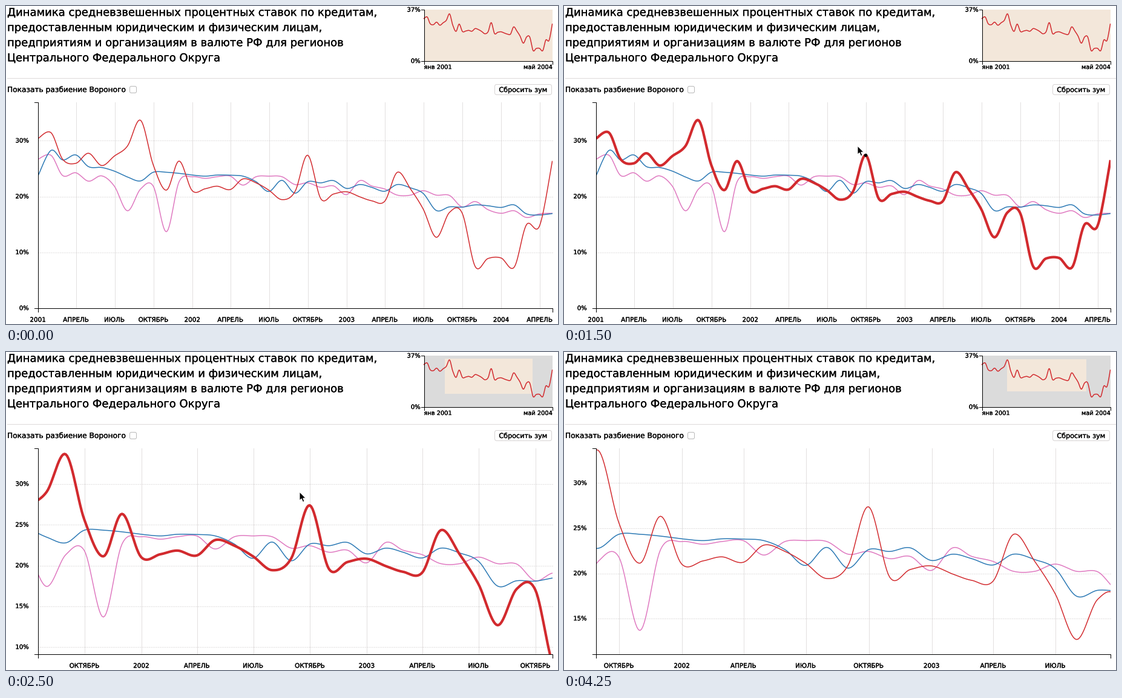
Recreate the animation shown at these times as a matplotlib script. Size 912 by 525 pixels, loop 4.5 s.

```python
import numpy as np
import matplotlib.pyplot as plt
from matplotlib.animation import FuncAnimation
from matplotlib.patches import FancyBboxPatch, Polygon, Rectangle
from matplotlib.patheffects import withStroke

W, H, DPI = 912, 525, 96
PX = 72 / DPI
plt.rcParams["font.family"] = "DejaVu Sans"

X0, X1, Y0, Y1 = 52.5, 902.5, 158.5, 498.5      # main plot
MX0, MX1, MY0, MY1 = 690.5, 902.5, 5.5, 90.5    # overview plot
UNIT = 9.22                                     # pixels per percent, unzoomed
FOCUS = (491, 231.5)
RED, BLUE, PINK = "#d22a2e", "#2a78b4", "#df78c0"
SAND, GREY = "#f3e7da", "#dbdbdb"

RATES = {
    PINK: [26.6, 27.35, 23.7, 24.2, 22.7, 23.65, 21.8, 17.4, 21.3, 21.8, 13.65,
           22.6, 23.5, 23.2, 23.5, 23.6, 22.0, 23.5, 23.6, 23.5, 22.1, 22.4,
           21.6, 21.85, 20.3, 22.8, 21.85, 21.3, 20.2, 20.2, 21.0, 20.2, 20.15,
           18.1, 19.05, 17.6, 16.95, 17.4, 16.2, 16.85, 16.95],
    BLUE: [23.55, 28.2, 26.5, 27.4, 25.3, 25.15, 24.5, 23.45, 22.75, 24.3, 24.3,
           24.1, 23.8, 23.6, 23.8, 23.77, 23.6, 22.6, 20.85, 22.85, 20.55, 22.6,
           22.4, 22.8, 21.4, 22.1, 21.6, 20.9, 22.1, 21.5, 20.5, 17.45, 18.1,
           18.05, 18.45, 18.3, 18.0, 18.45, 16.85, 16.65, 16.9],
    RED: [30.3, 31.4, 26.6, 25.9, 27.7, 25.5, 27.2, 29.0, 33.6, 25.6, 21.1,
          26.3, 21.0, 21.35, 21.8, 21.2, 23.1, 22.4, 21.1, 19.4, 20.85, 27.35,
          19.55, 20.4, 20.8, 19.9, 19.2, 19.1, 24.3, 21.3, 17.7, 12.65, 17.1,
          17.0, 7.4, 8.85, 8.95, 7.3, 14.9, 14.7, 26.25],
}

months = np.arange("2001-01", "2004-06", dtype="datetime64[M]")
days = (months.astype("datetime64[D]") - np.datetime64("2001-01-01")).astype(float)
month_x = X0 + days / days[-1] * (X1 - X0)


def rate_y(v):
    return Y1 - UNIT * np.asarray(v)


def cardinal(v, steps=14):
    """Smooth cardinal spline through the given values."""
    p = np.pad(v, 1, mode="edge")
    m = (p[2:] - p[:-2]) / 2
    a, b, ma, mb = (q[:, None] for q in (p[1:-2], p[2:-1], m[:-1], m[1:]))
    t = np.arange(steps) / steps
    s = ((2*t**3 - 3*t**2 + 1) * a + (t**3 - 2*t**2 + t) * ma
         + (3*t**2 - 2*t**3) * b + (t**3 - t**2) * mb)
    return np.append(s.ravel(), v[-1])


curve_x = cardinal(month_x)
curves = {c: cardinal(rate_y(v)) for c, v in RATES.items()}


def zoom(q, k, axis):
    return FOCUS[axis] + k * (q - FOCUS[axis])


def unzoom(q, k, axis):
    return FOCUS[axis] + (q - FOCUS[axis]) / k


def mini_x(x):
    return MX0 + (x - X0) / (X1 - X0) * (MX1 - MX0)


def mini_y(y):
    return MY0 + (y - Y0) / (Y1 - Y0) * (MY1 - MY0)


fig = plt.figure(figsize=(W / DPI, H / DPI), dpi=DPI, facecolor="white")
ax = fig.add_axes([0, 0, 1, 1])
ax.set(xlim=(0, W), ylim=(H, 0))
ax.axis("off")


def line(x, y, color="black", w=1.0, z=2, **kw):
    return ax.plot(x, y, color=color, lw=w * PX, zorder=z, **kw)[0]


def text(x, y, s, size, ha="left", weight=0.3):
    return ax.text(x, y, s, fontsize=size * PX, ha=ha, va="baseline", zorder=8,
                   path_effects=[withStroke(linewidth=weight * PX, foreground="black")])


def box(x, y, w, h, radius, edge):
    ax.add_patch(FancyBboxPatch((x, y), w, h, fc="white", ec=edge, lw=PX,
                                boxstyle=f"round,pad=0,rounding_size={radius}"))


def axes_frame(x0, x1, y0, y1, tick):
    line([x0 - tick, x0, x0, x0 - tick], [y0, y0, y1, y1], z=6, solid_joinstyle="miter")
    line([x0, x0, x1, x1], [y1 + tick, y1, y1, y1 + tick], z=6, solid_joinstyle="miter")


def draw_static():
    title = ("Динамика средневзвешенных процентных ставок по кредитам,",
             "предоставленным юридическим и физическим лицам,",
             "предприятиям и организациям в валюте РФ для регионов",
             "Центрального Федерального Округа")
    for i, row in enumerate(title):
        text(2, 16.3 + 25 * i, row, 18)
    line([2, W], [118.5, 118.5], "#dedada")

    text(2, 142, "Показать разбиение Вороного", 12.2)
    box(204.5, 132.5, 11, 11, 2.5, "#b9b9b9")
    box(807.5, 129.5, 94, 17, 3.5, "#d6d3d3")
    text(854.5, 142, "Сбросить зум", 11.2, "center")

    text(684.5, 9.3, "37%", 10, "right")
    text(684.5, 94, "0%", 10, "right")
    text(690.5, 104, "янв 2001", 9.8)
    text(902.5, 104, "май 2004", 9.8, "right")
    ax.add_patch(Rectangle((MX0, MY0), MX1 - MX0, MY1 - MY0, fc=GREY, lw=0, zorder=1))
    line(mini_x(curve_x), mini_y(curves[RED]), RED, 1.5, 4)
    axes_frame(MX0, MX1, MY0, MY1, 5)
    axes_frame(X0, X1, Y0, Y1, 6)


draw_static()

plot_area = Rectangle((X0, Y0), X1 - X0, Y1 - Y0, transform=ax.transData)
brush = ax.add_patch(Rectangle((0, 0), 1, 1, fc=SAND, lw=0, zorder=2))
paths = {c: line([], [], c, 1.5, 4 + i * 0.1) for i, c in enumerate(curves)}
for p in paths.values():
    p.set_clip_path(plot_area)
dot, = ax.plot([], [], "o", color="black", ms=5.6 * PX, mew=0, zorder=7)
ARROW = np.array([(0, 0), (0, 14.2), (3.2, 11.3), (5.5, 16.6), (8, 15.6),
                  (5.8, 10.3), (10.2, 10.3)])
cursor = ax.add_patch(Polygon(ARROW, fc="black", ec="white", lw=1.0 * PX, zorder=9))

FRAMES = 18
ZOOM = {8: 1.142, 9: 1.318, 10: 1.46, 11: 1.617}
POINTER = {1: (507, 168), 2: (497, 180), 4: (491, 216.5), 5: (485, 231),
           14: (505, 177.5), 15: (509, 105), 16: (512, 0), 17: None}
ticks = []


def latest(steps, n, start):
    keys = [f for f in steps if f <= n]
    return steps[max(keys)] if keys else start


def draw_ticks(k):
    while ticks:
        ticks.pop().remove()
    for m, x in zip(months[::3], zoom(month_x[::3], k, 0)):
        if not X0 - 0.1 <= x <= X1:
            continue
        quarter = m.astype(int) % 12 // 3
        label = (str(m)[:4], "АПРЕЛЬ", "ИЮЛЬ", "ОКТЯБРЬ")[quarter]
        gx = np.floor(x) + 0.5
        ticks.append(line([gx, gx], [Y0, Y1], "#e2dfdf", 1, 1))
        ticks.append(text(x, 521.3, label, 10.4, "center"))
    span = (Y1 - Y0) / UNIT / k
    for v in range(0, 40, 10 if span / 5 >= 50 ** 0.5 else 5):
        y = zoom(rate_y(v), k, 1)
        if Y0 <= y <= Y1 + 0.1:
            gy = np.floor(y) + 0.5
            ticks.append(line([X0, X1], [gy, gy], "#c6c3c3", 1, 1,
                              dashes=(1, 2), dash_capstyle="butt"))
            ticks.append(text(37.5, y + 3.5, f"{v}%", 10, "right"))


def update(n):
    k = latest(ZOOM, n, 1)
    draw_ticks(k)
    for c, p in paths.items():
        p.set_data(zoom(curve_x, k, 0), zoom(curves[c], k, 1))
    paths[RED].set_linewidth((4.2 if 4 <= n < 15 else 1.5) * PX)

    left, right = (mini_x(unzoom(x, k, 0)) for x in (X0, X1))
    top, bottom = (mini_y(unzoom(y, k, 1)) for y in (Y0, Y1))
    brush.set_bounds(left, top, right - left, bottom - top)

    dot.set_data([498], [246])
    dot.set_visible(4 <= n < 8)
    tip = latest(POINTER, n, None)
    cursor.set_visible(tip is not None)
    if tip:
        cursor.set_xy(ARROW + tip)
    return []


anim = FuncAnimation(fig, update, frames=FRAMES, init_func=lambda: update(0),
                     interval=250, repeat=True, repeat_delay=0, blit=False)
plt.show()
```
